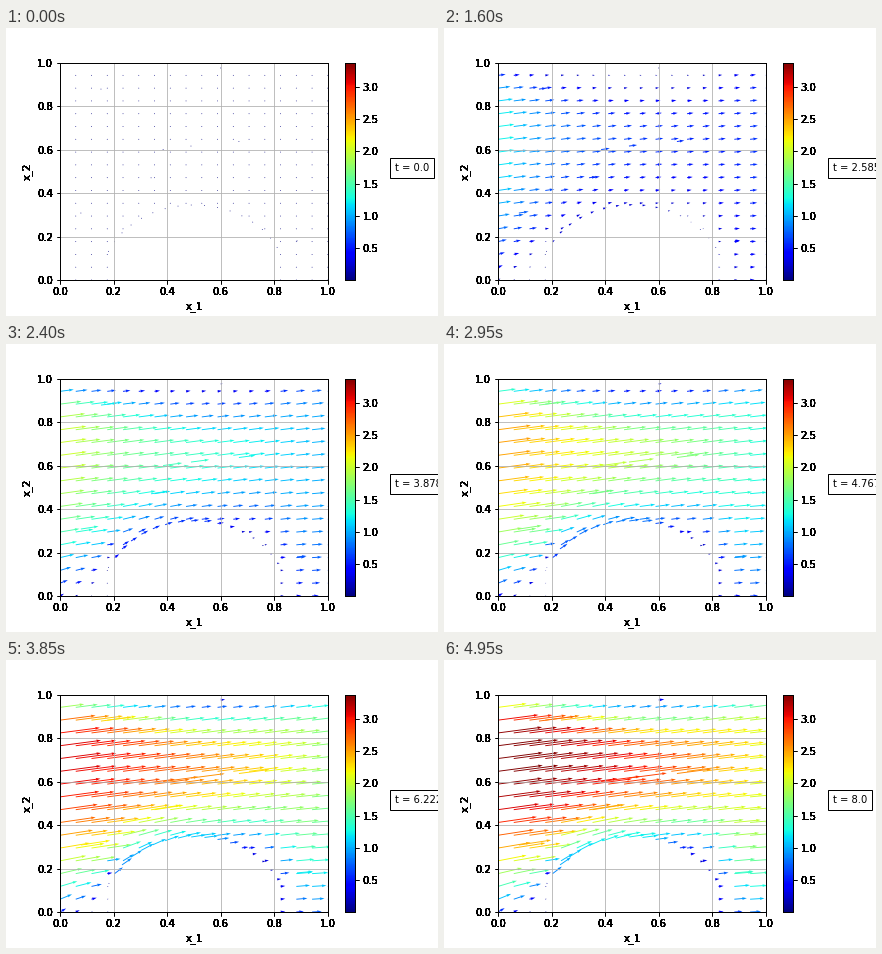
A matplotlib script for the animation above (5000 ms loop, 432x288 px).

```python
import numpy as np
import matplotlib.pyplot as plt
from matplotlib.animation import FuncAnimation

FRAMES = 100
T_END = 8.0
VMAX = 3.376
N = 17          # grid cells per side
RADIUS = 0.345  # bump on the floor, centred at x = 0.5
TIMES = np.linspace(0, T_END, FRAMES)

plt.rcParams["font.family"] = "DejaVu Sans"
plt.rcParams["font.size"] = 10


def mesh_points():
    """Regular nodes outside the bump, nodes on its arc, a few loose ones."""
    gx, gy = np.meshgrid(np.arange(N + 1) / N, np.arange(N + 1) / N)
    gx, gy = gx.ravel(), gy.ravel()
    keep = (np.hypot(gx - 0.5, gy) > 0.335) | (abs(gx - 0.5) > 0.32)
    angle = np.linspace(0.45, 2.75, 17)
    loose = np.array([(0.153, 0.878), (0.078, 0.308), (0.34, 0.47),
                      (0.385, 0.6), (0.489, 0.616), (0.668, 0.637),
                      (0.6, 0.975), (0.885, 0.18)])
    x = np.concatenate([gx[keep], 0.5 + RADIUS * np.cos(angle), loose[:, 0]])
    y = np.concatenate([gy[keep], RADIUS * np.sin(angle), loose[:, 1]])
    return x, y


X, Y = mesh_points()
DIST = np.hypot(X - 0.5, Y)
BUMP = np.sqrt(np.clip(0.35**2 - (X - 0.5) ** 2, 0, None))
OUTLET = np.clip((X - 0.74) / 0.2, 0, 1)


def flow_slope():
    """Rise over run: a gentle climb, steeper at the inlet floor and bump."""
    base = 0.13 * (1 - 0.6 * OUTLET * (1 - Y))
    floor = 0.45 * np.exp(-Y / 0.12 - X / 0.2)
    near = np.exp(-np.clip(DIST - RADIUS, 0, None) / 0.06)
    climb = np.where(X > 0.2, 2 * np.clip(0.5 - X, 0, None), 0)
    return base + floor + climb * near


def lower_profile():
    """Speed share below the core, from the floor or bump upwards."""
    lee = 1 - np.clip((X - 0.55) / 0.25, 0, 1)
    lift = 0.07 * np.exp(-X / 0.1) + 0.22 * BUMP / 0.35 * lee
    q = np.clip((Y - BUMP) / (0.68 - BUMP), 0, 1)
    profile = np.sin(np.pi / 2 * (lift + (1 - lift) * q)) ** 0.8
    stagnation = np.clip((DIST - 0.33) / 0.1, 0.15, 1)
    return profile * np.where(X < 0.2, stagnation, 1)


SLOPE = flow_slope()
NORM = np.hypot(1, SLOPE)
LOWER = lower_profile()
UPPER = np.clip((Y - 0.68) / 0.32, 0, 1)


def speed(t):
    inlet = 3.38 * np.sin(np.pi / 2 * t / T_END) ** 1.4
    core = inlet * (1 - np.exp(-((t / 2.9) ** 1.6)))
    outlet = 0.26 * t
    along = (core * (1 - 0.42 * X**1.6)
             + (inlet - core) * np.exp(-X / 0.15)
             + (outlet - 0.6 * core) * np.exp(-(1 - X) / 0.12))
    power = (2.2 + 0.35 * t) * (1 - 0.62 * np.sin(np.pi * X))
    across = LOWER * (1 - UPPER**power)
    even = 0.35 + 0.5 * np.exp(-t / 3)
    across = across + OUTLET * even * (1 - across)
    return np.clip(along * across, 0, None) * (Y < 1)


def heavy(*artists, times=3):
    """Paint artists repeatedly so that their soft edges turn solid."""
    for artist in artists:
        def draw(renderer, once=artist.draw):
            for _ in range(times):
                once(renderer)
        artist.draw = draw


def heavy_axis(axis):
    ticks = axis.get_major_ticks()
    heavy(*(line for tick in ticks for line in (tick.tick1line, tick.tick2line)))
    heavy(axis.label, *(label for tick in ticks
                        for label in (tick.label1, tick.label2)), times=14)


fig, ax = plt.subplots(figsize=(6, 4), dpi=72)
fig.subplots_adjust(left=0.125, right=0.9, bottom=0.125, top=0.88)
zero = np.zeros_like(X)
quiver = ax.quiver(X, Y, zero, zero, zero, cmap="jet", scale=20)
quiver.set_clim(0.004, VMAX)
bar = fig.colorbar(quiver, ax=ax, ticks=np.arange(0.5, 3.1, 0.5))

ax.set(xlim=(0, 1), ylim=(0, 1), xlabel="x_1", ylabel="x_2",
       xticks=np.linspace(0, 1, 6), yticks=np.linspace(0, 1, 6))
ax.grid(True)
clock = ax.text(1.25, 0.5, "t = 0.0", bbox=dict(facecolor="white", pad=5))

for axis in (ax.xaxis, ax.yaxis, bar.ax.yaxis):
    heavy_axis(axis)
heavy(bar.outline, *ax.spines.values())


def update(i):
    s = speed(TIMES[i])
    quiver.set_UVC(s / NORM, s * SLOPE / NORM, s)
    clock.set_text(f"t = {TIMES[i]}")
    return quiver, clock


anim = FuncAnimation(fig, update, frames=FRAMES, interval=50,
                     repeat=True, repeat_delay=0, blit=False)
plt.show()
```
